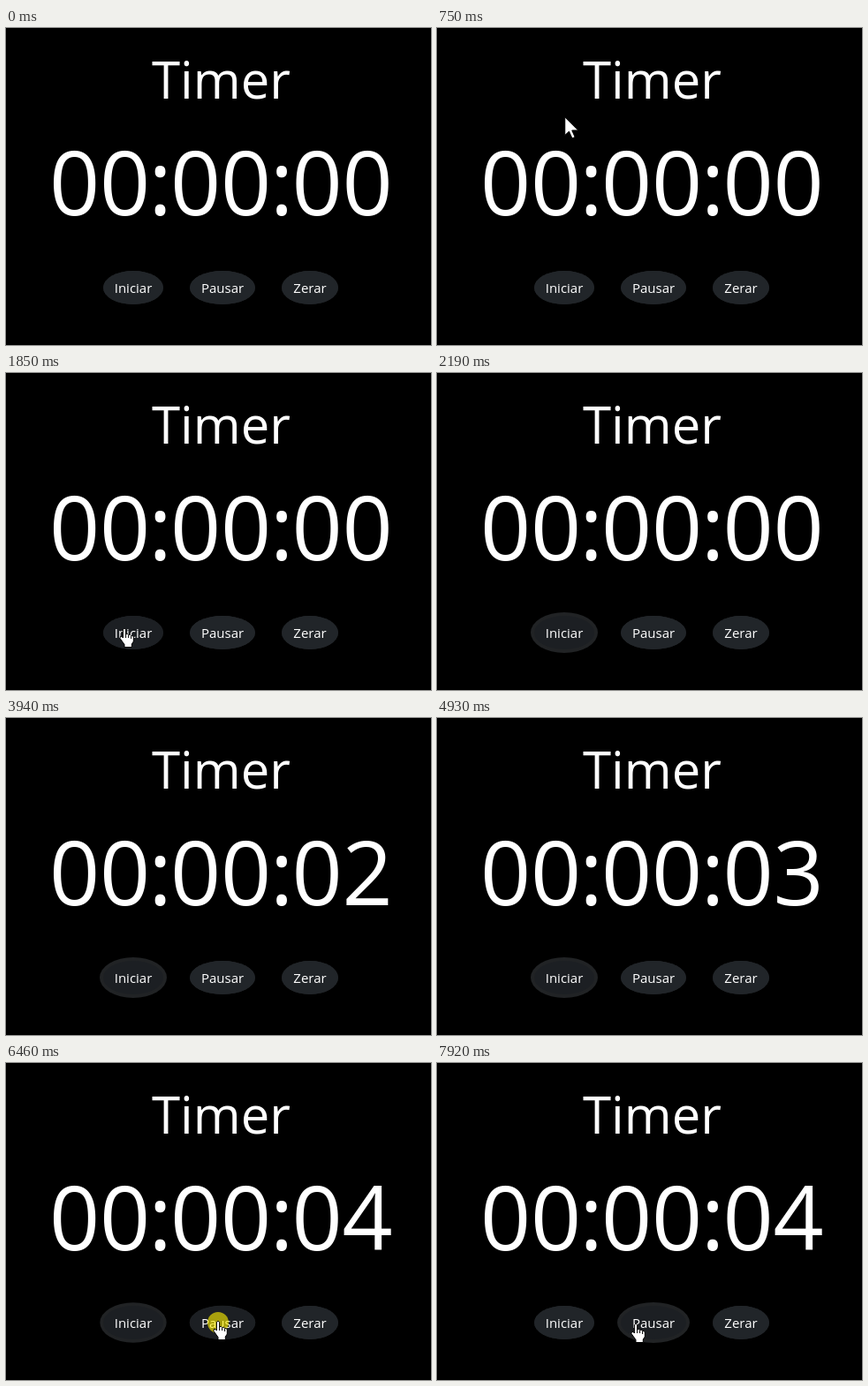
Recreate the animation shown at these times as an HTML page. Size 481 px wide and 359 px high, loop 7.99 s.

```html
<!DOCTYPE html>
<html lang="pt">
<head>
<meta charset="utf-8">
<title>Timer</title>
<style>
  html, body { margin: 0; width: 100%; height: 100%; overflow: hidden; background: #000; }
  svg { display: block; width: 481px; height: 359px; }
  text { font-family: "Open Sans", "Noto Sans", sans-serif; fill: #fff; }
  #clock text { font-size: 100px; text-anchor: middle; }
  #buttons text { font-size: 15px; text-anchor: middle; }
  #cursor path { fill: #fff; stroke: #000; stroke-width: 1; stroke-linejoin: round; }
</style>
</head>
<body>
<svg viewBox="0 0 481 359">
  <rect width="481" height="359"/>
  <text x="165" y="80" font-size="58">Timer</text>
  <g id="clock"></g>
  <g id="buttons"></g>
  <circle id="click" r="12" fill="#fff000" fill-opacity=".62"/>
  <g id="cursor">
    <path id="arrow" d="M0 0V20.5L4.7 16.2 8.2 24 11.4 22.6 8 15H15Z"/>
    <g id="hand">
      <path d="M-1.6 1.5Q0-1 1.6 1.5V7Q3.2 5.3 4.6 7.5Q6.2 6.2 7.6 8.5Q9.4 7.4 10.3 10V15L8.3 18V21.5H0V18.5L-5 11.5Q-5 8-3 9.5L-1.6 11Z"/>
      <path d="M1.6 7v4M4.6 8v3M7.6 9v3"/>
    </g>
  </g>
</svg>
<script>
const LOOP = 7990;
const BUTTON_Y = 294, BUTTON_RY = 19;
const CLICKS = [1910, 6435];
const TICKS = [2910, 3940, 4930, 5930];

// Pointer visits as [time, x, y]; the pointer is hidden between visits.
const VISITS = [
  [[270, 296, 258], [650, 112, 84], [1020, 232, 146], [1090, 230, 155],
   [1370, 213, 264], [1650, 146, 284], [1850, 134, 289], [1990, 138, 289],
   [2060, 260, 262], [2120, 407, 236], [2190, 407, 236]],
  [[5390, 460, 255], [5460, 380, 270], [5600, 228, 291], [5670, 240, 288],
   [5860, 240, 292], [6530, 240, 292], [6700, 243, 290], [7919, 243, 290],
   [7920, 225, 295], [LOOP, 225, 295]]
];

const byId = id => document.getElementById(id);
const clamp = v => Math.min(1, Math.max(0, v));
const smooth = p => p * p * (3 - 2 * p);
const show = (node, on) => node.setAttribute("display", on ? "inline" : "none");

function add(parent, tag, attrs, text = "") {
  const node = document.createElementNS("http://www.w3.org/2000/svg", tag);
  for (const key in attrs) node.setAttribute(key, attrs[key]);
  node.textContent = text;
  return parent.appendChild(node);
}

const glyphs = [77.5, 134.5, 174.5, 214.5, 271.5, 312, 352, 409]
  .map((x, i) => add(byId("clock"), "text", { x, y: 212 }, "00:00:00"[i]));
const lastDigit = glyphs[7];

const buttons = [["Iniciar", 144, 34], ["Pausar", 245, 37], ["Zerar", 344, 32]]
  .map(([label, cx, rx]) => {
    const group = byId("buttons");
    const ring = add(group, "ellipse", { cx, cy: BUTTON_Y, fill: "#212325" });
    const face = add(group, "ellipse", { cx, cy: BUTTON_Y, rx, ry: BUTTON_RY });
    add(group, "text", { x: cx, y: 300 }, label);
    return { cx, rx, ring, face };
  });

function pointerAt(t) {
  const path = VISITS.find(v => t >= v[0][0] && t < v[v.length - 1][0]);
  if (!path) return null;
  const i = path.findIndex(key => key[0] > t);
  const [t0, x0, y0] = path[i - 1], [t1, x1, y1] = path[i];
  const p = (t - t0) / (t1 - t0);
  return { x: x0 + (x1 - x0) * p, y: y0 + (y1 - y0) * p };
}

function draw(t) {
  lastDigit.textContent = TICKS.filter(tick => t >= tick).length;

  const pointer = pointerAt(t);
  const started = smooth(clamp((t - CLICKS[0]) / 150));
  const paused = smooth(clamp((t - CLICKS[1]) / 150));
  const focus = [started - paused, paused, 0];
  let overButton = false;

  buttons.forEach(({ cx, rx, ring, face }, i) => {
    const hover = pointer &&
      Math.hypot((pointer.x - cx) / rx, (pointer.y - BUTTON_Y) / BUTTON_RY) < 1;
    overButton = overButton || hover;
    ring.setAttribute("rx", rx + 4 * focus[i]);
    ring.setAttribute("ry", BUTTON_RY + 4 * focus[i]);
    face.setAttribute("fill", hover || focus[i] > 0.5 ? "#1c1f23" : "#212529");
  });

  show(byId("cursor"), pointer);
  show(byId("hand"), overButton);
  show(byId("arrow"), !overButton);
  show(byId("click"), pointer && CLICKS.some(c => t >= c + 10 && t < c + 130));
  if (pointer) {
    byId("cursor").setAttribute("transform", `translate(${pointer.x} ${pointer.y})`);
    byId("click").setAttribute("cx", pointer.x);
    byId("click").setAttribute("cy", pointer.y + 2);
  }
}

const start = performance.now();
function frame() {
  draw((performance.now() - start) % LOOP);
  requestAnimationFrame(frame);
}
frame();
</script>
</body>
</html>
```
